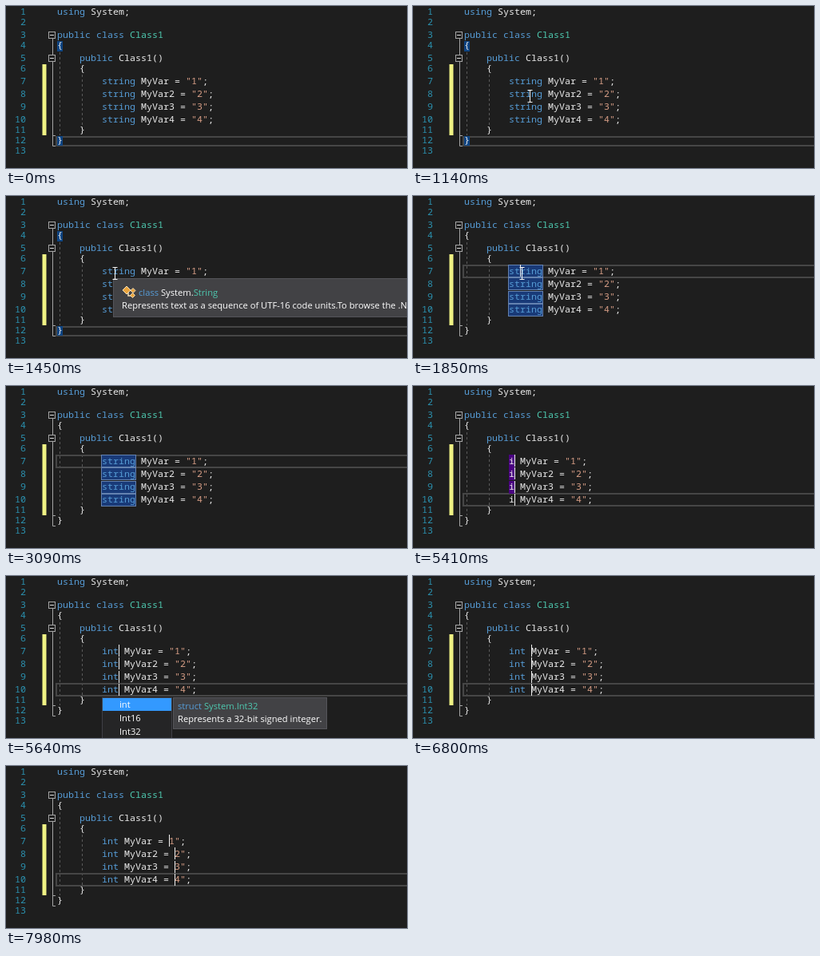
An HTML page with a canvas for the animation above (8000 ms loop, 502x203 px).

```html
<!DOCTYPE html>
<html lang="en">
<head>
<meta charset="utf-8">
<title>Multi-caret editing</title>
<style>
html, body { margin: 0; width: 100%; height: 100%; overflow: hidden; background: #1e1e1e; }
canvas { display: block; }
</style>
</head>
<body>
<canvas id="stage" width="502" height="203"></canvas>
<script>
const g = document.getElementById('stage').getContext('2d');
const LOOP = 8000, LEFT = 64, CHAR = 7;
const MONO = '11.667px "Noto Sans Mono", "DejaVu Sans Mono", monospace';
const UI = '11.2px "Open Sans", "Noto Sans", sans-serif';
const KEY = '#569cd6', TYPE = '#4ec9b0', PLAIN = '#ebebeb', STR = '#d69d85', WHITE = '#ffffff';
const keywords = new Set(['using', 'public', 'class', 'string', 'int']);
const baselines = [11, 24, 40, 53, 69, 82, 98, 114, 130, 146, 159, 172, 185];
const rowTops = [86, 102, 119, 135];   // the four edited lines

const col = n => LEFT + n * CHAR;
const passed = (t, times) => times.filter(s => t >= s).length;
const during = (t, a, b) => t >= a && t < b;

function rect(x, y, w, h, fill, border) {
  g.fillStyle = fill;
  g.fillRect(x, y, w, h);
  if (border) {
    g.strokeStyle = border;
    g.lineWidth = 1;
    g.strokeRect(x + .5, y + .5, w - 1, h - 1);
  }
}

function line(color, width, ...points) {
  g.strokeStyle = color;
  g.lineWidth = width;
  g.beginPath();
  points.forEach(([x, y]) => g.lineTo(x, y));
  g.stroke();
}

function text(s, x, y, color, font = MONO) {
  g.font = font;
  g.fillStyle = color;
  g.fillText(s, x, y);
  return x + g.measureText(s).width;
}

function codeLine(s, row) {
  for (const m of s.matchAll(/"?\d"|\w+|[^\w\s]/g)) {
    const token = m[0];
    const color = keywords.has(token) ? KEY
      : /\d"/.test(token) ? STR
      : row === 2 && token === 'Class1' ? TYPE : PLAIN;
    text(token, col(m.index), baselines[row], color);
  }
}

function gutter() {
  g.textAlign = 'right';
  baselines.forEach((y, i) => text(i + 1, 25, y, '#2b91af'));
  g.textAlign = 'left';
  rect(45.5, 73, 5, 89, '#eff284');
  const grey = '#a5a5a5';
  line(grey, 1, [58.5, 41], [58.5, 175.5], [62, 175.5]);
  line(grey, 1, [58.5, 162.5], [62, 162.5]);
  for (const y of [32, 61]) {
    rect(53, y, 9, 9, '#1e1e1e', grey);
    line('#dcdcdc', 1, [55, y + 4.5], [60, y + 4.5]);
  }
  g.setLineDash([3, 3]);
  line('#5a5a5a', 1, [67.5, 58], [67.5, 162]);
  line('#5a5a5a', 1, [95.5, 86], [95.5, 150]);
  g.setLineDash([]);
}

function currentLine(t) {
  if (during(t, 3640, 4020)) return;
  const [y, h] = t < 1530 ? [164, 11] : [87 + 16 * passed(t, [4020, 4170, 4400]), 15];
  g.strokeStyle = '#464646';
  g.lineWidth = 2;
  g.strokeRect(63, y, 450, h);
}

function highlights(t, selected) {
  if (t < 1680) {
    rect(64, 44, 7, 13, '#0e4583');
    rect(64, 163, 7, 12, '#0e4583');
  }
  rowTops.forEach((y, i) => {
    if (during(t, 1850, 5410)) {
      rect(119, y, 44, 16, i < selected ? '#2263b4' : '#193a78', i < selected ? '#4f8bcc' : '#6482b0');
    }
    // only the secondary carets get a typing mark
    if (during(t, 5410, 5560) && i < 3) rect(120, y, 7, 16, '#4b0082');
    if (during(t, 6420, 6800)) rect(119, y, 22, 16, '#193a78', '#6482b0');
  });
  if (during(t, 7200, 7810)) {
    rect(211, 135, 7, 15, '#0e4583');
    rect(225, 135, 7, 15, '#0e4583');
  }
}

function carets(t, word, selected) {
  const caret = (x, i) => rect(x, rowTops[i], 1, 15, '#f0f0f0');
  if (during(t, 1530, 2080) || during(t, 2610, 3090)) caret(134, 0);
  rowTops.forEach((y, i) => {
    const longer = i ? CHAR : 0;
    if (t >= 7120) caret(204 + longer, i);
    else if (t >= 6970) caret(190 + longer, i);
    else if (t >= 6800) caret(148, i);
    else if (t >= 5410) caret(col(8 + word.length), i);
    else if (t >= 4020 && i < selected) caret(162, i);
  });
}

function diamond(x, y, r) {
  g.beginPath();
  g.moveTo(x - r, y);
  g.lineTo(x, y - r);
  g.lineTo(x + r, y);
  g.lineTo(x, y + r);
  g.closePath();
  g.fillStyle = '#e8a33d';
  g.fill();
  g.strokeStyle = '#f4dfb8';
  g.lineWidth = 1;
  g.stroke();
}

function quickInfo() {
  rect(134, 103, 380, 49, '#424245', '#55555a');
  line('#f4dfb8', 1.5, [151, 118], [159, 118.5]);
  line('#f4dfb8', 1.5, [153, 119], [153, 125], [158, 125]);
  diamond(151, 118, 5);
  diamond(159, 118.5, 3);
  diamond(158.5, 124.5, 3);
  let x = text('class ', 166, 125, KEY, UI);
  x = text('System.', x, 125, WHITE, UI);
  text('String', x, 125, TYPE, UI);
  text('Represents text as a sequence of UTF-16 code units.To browse the .NET source code', 145, 141, WHITE, UI);
}

function completion(t) {
  rect(120, 152, 88, 60, '#252526', '#3f3f46');
  rect(121, 153, 86, 16, '#3399ff');
  ['int', 'Int16', 'Int32'].forEach((s, i) => text(s, 142, 165 + i * 17, WHITE, UI));
  if (t < 5640) return;
  rect(209, 152, 193, 40, '#424245', '#55555a');
  const x = text('struct ', 215, 167, KEY, UI);
  text('System.Int32', x, 167, TYPE, UI);
  text('Represents a 32-bit signed integer.', 215, 183, WHITE, UI);
}

function iBeam(x, y) {
  line('#f4f4f4', 1, [x, y - 7], [x, y + 7]);
  line('#f4f4f4', 1, [x - 3, y - 7.5], [x + 3, y - 7.5]);
  line('#f4f4f4', 1, [x - 3, y + 7.5], [x + 3, y + 7.5]);
}

function mouse(t) {
  if (!during(t, 680, 3090)) return;
  if (t < 2860) {
    const p = Math.min(1, Math.floor((t - 680) / 77) / 9);
    const rest = (1 - p) ** 2;
    iBeam(Math.round(136 + 50 * rest) + .5, Math.round(97 + 80 * rest));
  } else {
    const step = Math.min(3, Math.floor((t - 2860) / 77) + 1);
    iBeam(136.5 - step * 1.5, 97 + step * 11);
  }
}

function draw(t) {
  rect(0, 0, 502, 203, '#1e1e1e');
  const word = t < 5410 ? 'string' : t < 5560 ? 'i' : t < 5640 ? 'in' : 'int';
  const selected = t < 5410 ? passed(t, [3640, 4020, 4170, 4400]) : 0;
  const open = t < 7810 ? '"' : '';
  const vars = [1, 2, 3, 4].map(n => `        ${word} MyVar${n > 1 ? n : ''} = ${open}${n}";`);
  gutter();
  currentLine(t);
  highlights(t, selected);
  ['using System;', '', 'public class Class1', '{', '    public Class1()', '    {',
    ...vars, '    }', '}'].forEach(codeLine);
  carets(t, word, selected);
  if (during(t, 1450, 1530)) quickInfo();
  if (during(t, 5490, 6100)) completion(t);
  mouse(t);
}

const start = performance.now();
function tick() {
  draw((performance.now() - start) % LOOP);
  requestAnimationFrame(tick);
}
tick();
</script>
</body>
</html>
```
